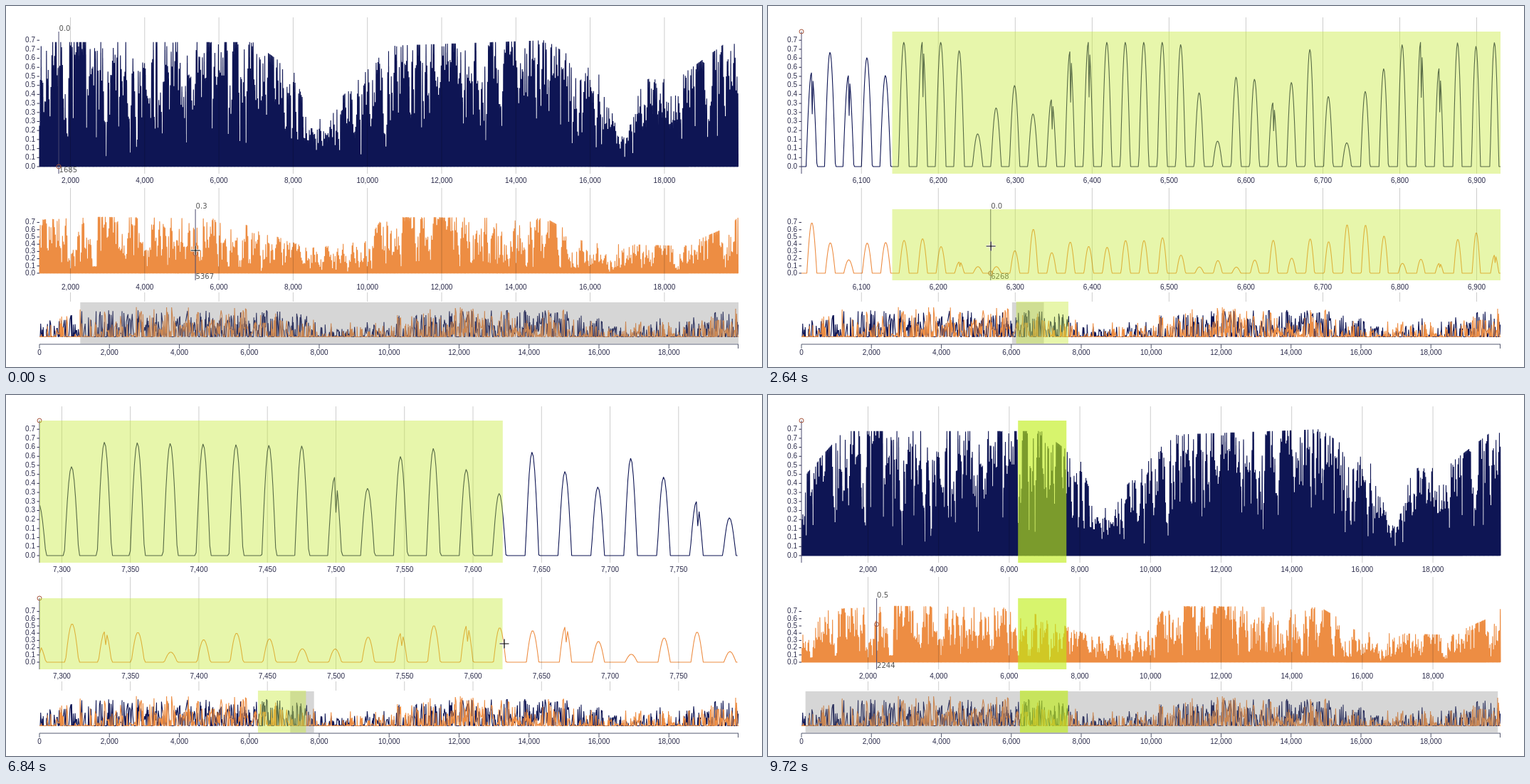
An HTML page with a canvas that plays this animation: 1062 px wide and 508 px high, repeating every 9.84 s.

```html
<!DOCTYPE html>
<html lang="en">
<head>
<meta charset="utf-8">
<title>Linked charts</title>
<style>
html, body { margin: 0; width: 100%; height: 100%; overflow: hidden; background: #fff; }
canvas { display: block; }
</style>
</head>
<body>
<canvas id="stage" width="1062" height="508"></canvas>
<script>
const LOOP = 9840, STEP = 120;
const LEFT = 47, RIGHT = 1029, WIDTH = RIGHT - LEFT;
const HOURS = 19990;
const NAVY = '#0e1554', ORANGE = '#ed8d43', INK = '#2b2b4b';
const GRID = 'rgba(0,0,0,.2)', AXIS = '#555a70';
const AXIS_FONT = '10px "Liberation Sans", Arial, sans-serif';
const HOVER_FONT = '10px "DejaVu Sans", Verdana, sans-serif';
const WHOLE = { start: 0, span: HOURS };
const stage = document.getElementById('stage');
const ctx = stage.getContext('2d');

const clamp = (v, low, high) => Math.max(low, Math.min(high, v));

// Linear interpolation through rows of [time, ...values]
function track(rows, t) {
  if (t <= rows[0][0]) return rows[0].slice(1);
  const i = rows.findIndex(row => row[0] > t);
  if (i < 0) return rows[rows.length - 1].slice(1);
  const from = rows[i - 1], to = rows[i];
  const k = (t - from[0]) / (to[0] - from[0]);
  return from.slice(1).map((v, j) => v + (to[j + 1] - v) * k);
}

function randomizer(seed) {
  return () => {
    seed = (seed + 0x6D2B79F5) | 0;
    let r = Math.imul(seed ^ (seed >>> 15), 1 | seed);
    r ^= r + Math.imul(r ^ (r >>> 7), 61 | r);
    return ((r ^ (r >>> 14)) >>> 0) / 4294967296;
  };
}

// ---- Data: one hump of daylight per day, under a seasonal ceiling and drifting weather ----
function makeSeries({ seed, ceiling, mean, swing, noon, dayScale }) {
  const random = randomizer(seed);
  const data = [];
  let weather = 0.5;
  for (let day = 0; day * 24 < HOURS; day++) {
    weather = 0.6 * weather + 0.4 * random();
    const gloom = random() < 0.06 ? 0.4 : 1;
    const notch = random() < 0.2 ? 0.57 : 1;
    const clearness = clamp(mean + (weather - 0.5) * swing, 0.12, 1) * gloom;
    const peak = track(ceiling, day * 24)[0] * clearness;
    const daylight = (12.6 - 4 * Math.cos(2 * Math.PI * day / 365)) * dayScale;
    for (let hour = 0; hour < 24; hour++) {
      const angle = Math.PI * (hour - noon) / daylight;
      const sun = Math.abs(angle) < Math.PI / 2 ? Math.cos(angle) : 0;
      data.push(peak * sun * (hour === 12 ? notch : 1));
    }
  }
  return data;
}

const navyData = makeSeries({
  seed: 11, noon: 11.1, dayScale: 1, mean: 0.78, swing: 1.6,
  ceiling: [[0, .4], [1300, .69], [6900, .69], [8000, .53], [8500, .22], [9600, .45], [10600, .67],
    [14800, .7], [16300, .5], [16800, .14], [17400, .48], [18600, .53], [19600, .68]]
});
const orangeData = makeSeries({
  seed: 29, noon: 11.5, dayScale: 0.92, mean: 0.66, swing: 2.1,
  ceiling: [[0, .35], [800, .74], [2800, .78], [6300, .75], [8400, .35], [10000, .45], [10400, .78],
    [14800, .76], [16000, .42], [18500, .38], [19500, .6], [20000, .78]]
});

const charts = [
  { data: navyData, color: NAVY, top: 36, zero: 226, unit: 254, ticks: 14, perUnit: 20 },
  { data: orangeData, color: ORANGE, top: 286, zero: 376, unit: 102, ticks: 7, perUnit: 10 }
];

// ---- Motion ----
const VIEWS = [ // time, first hour, visible hours
  [0, 1166, 18830], [1912, 1166, 18830], [2436, 6022, 909], [4440, 6022, 909],
  [5160, 7019, 909], [6600, 7019, 909], [7560, 7562.3, 90.1], [8640, 7562.3, 90.1],
  [9480, 115, 19799], [LOOP, 115, 19799]
];
const SELECTIONS = [ // time, from hour, to hour
  [360, 6140, 6140], [840, 6140, 7632], [3120, 6140, 7632], [3840, 6248, 7630],
  [5520, 6248, 7630], [5640, 6248, 7623], [8160, 6248, 7620]
];
const POINTER = [ // time, x, y
  [0, 266.1, 344], [360, 306, 340], [720, 385, 338], [1080, 313.1, 338], [2640, 313.1, 338],
  [3000, 183, 376], [3840, 292.2, 376], [3960, 307, 376], [4440, 365, 445], [5160, 414, 445],
  [5400, 707, 350], [5520, 700, 350], [7680, 700, 350], [8040, 675, 351], [8640, 675, 351],
  [9480, 152.6, 345]
];

// Zooming keeps one hour fixed on screen, so the start is linear in the span.
function viewAt(t) {
  const i = VIEWS.findIndex(row => row[0] > t);
  const [t0, a0, w0] = VIEWS[i - 1], [t1, a1, w1] = VIEWS[i];
  const k = (t - t0) / (t1 - t0);
  const span = w0 * (w1 / w0) ** k;
  const share = w0 === w1 ? k : (span - w0) / (w1 - w0);
  return { start: a0 + (a1 - a0) * share, span };
}

const selectionAt = t => t < SELECTIONS[0][0] ? null : track(SELECTIONS, t);
const xIn = (view, hour) => LEFT + (hour - view.start) / view.span * WIDTH;

// ---- Drawing ----
function line(x1, y1, x2, y2, color) {
  ctx.strokeStyle = color;
  ctx.lineWidth = 1;
  ctx.beginPath();
  ctx.moveTo(x1, y1);
  ctx.lineTo(x2, y2);
  ctx.stroke();
}

function label(text, x, y, align, font = AXIS_FONT, color = INK) {
  ctx.font = font;
  ctx.fillStyle = color;
  ctx.textAlign = align;
  ctx.textBaseline = 'middle';
  ctx.fillText(text, x, y);
}

function plot(g, data, view, zero, unit, color, stride = () => 1) {
  const last = Math.min(HOURS, Math.floor(view.start + view.span));
  g.strokeStyle = color;
  g.lineWidth = 1.1;
  g.lineJoin = 'bevel';
  g.beginPath();
  for (let h = Math.ceil(view.start); h <= last; h += stride()) {
    g.lineTo(xIn(view, h), zero - data[h] * unit);
  }
  g.stroke();
}

function band(view, from, to, top, bottom, color) {
  const x1 = clamp(xIn(view, from), LEFT, RIGHT), x2 = clamp(xIn(view, to), LEFT, RIGHT);
  ctx.fillStyle = color;
  ctx.fillRect(x1, top, x2 - x1, bottom - top);
}

function tickStep(span) {
  const raw = span / 10, power = 10 ** Math.floor(Math.log10(raw)), error = raw / power;
  return power * (error >= Math.sqrt(50) ? 10 : error >= Math.sqrt(10) ? 5 : error >= Math.SQRT2 ? 2 : 1);
}

function eachTick(view, draw) {
  const step = tickStep(view.span), end = view.start + view.span;
  for (let v = Math.ceil(view.start / step) * step; v < end; v += step) {
    draw(xIn(view, v), v.toLocaleString('en-US'));
  }
}

// Without a hovered hour the marker rests in the top left corner.
function drawHover({ data, top, zero, unit }, view, hour) {
  let x = LEFT, y = top;
  if (hour !== null) {
    x = xIn(view, hour);
    y = zero - data[hour] * unit;
    label(data[hour].toFixed(1), x + 0.5, top - 4, 'left', HOVER_FONT, '#555');
    label(String(hour), x + 0.5, zero + 5, 'left', HOVER_FONT, '#555');
  }
  line(x, top, x, zero + 10, '#4a4a70');
  ctx.strokeStyle = '#a5533a';
  ctx.beginPath();
  ctx.arc(x, y, 3, 0, 2 * Math.PI);
  ctx.stroke();
}

function drawChart(chart, view, hour, selection, green) {
  const { data, color, top, zero, unit, ticks, perUnit } = chart;
  plot(ctx, data, view, zero, unit, color);
  for (let i = 0; i <= ticks; i++) {
    const y = zero - i / perUnit * unit;
    line(43.5, y, 47, y, INK);
    label((i / perUnit).toFixed(1), 41, y, 'right');
  }
  eachTick(view, (x, text) => {
    line(x, zero < 300 ? 16 : 256, x, zero + 10, GRID);
    label(text, x, zero + 20, 'center');
  });
  drawHover(chart, view, hour);
  if (selection) band(view, ...selection, top, zero + 10, green);
}

// The overview samples the data unevenly, which leaves sparse spikes.
const overview = document.createElement('canvas');
overview.width = stage.width;
overview.height = stage.height;
const strideRandom = randomizer(3);
for (const { data, color } of charts) {
  plot(overview.getContext('2d'), data, WHOLE, 465.5, 54, color, () => 1 + Math.floor(strideRandom() * 26));
}

function drawOverview(view, selection, green) {
  ctx.drawImage(overview, 0, 0);
  band(WHOLE, view.start, view.start + view.span, 417, 475, 'rgba(119,119,119,.3)');
  if (selection) band(WHOLE, ...selection, 416, 475, green);
  line(LEFT, 476, RIGHT, 476, AXIS);
  line(RIGHT - 0.5, 476, RIGHT - 0.5, 482, AXIS);
  eachTick(WHOLE, (x, text) => {
    line(x, 476, x, 482, AXIS);
    label(text, x, 488, 'center');
  });
}

function drawPointer(x, y, resizing) {
  const arms = resizing
    ? [[-7, 0, 7, 0], [-7, 0, -3, -4], [-7, 0, -3, 4], [7, 0, 3, -4], [7, 0, 3, 4]]
    : [[-6.5, 0, 6.5, 0], [0, -6.5, 0, 6.5]];
  for (const [color, width] of [['#fff', 3], ['#000', resizing ? 2 : 1.2]]) {
    ctx.strokeStyle = color;
    ctx.lineWidth = width;
    ctx.beginPath();
    for (const [x1, y1, x2, y2] of arms) {
      ctx.moveTo(x + x1, y + y1);
      ctx.lineTo(x + x2, y + y2);
    }
    ctx.stroke();
  }
}

// The hovered hour, the upper selection and the overview lag one step behind.
function draw(t) {
  const before = Math.max(0, t - STEP);
  const view = viewAt(t), lastView = viewAt(before);
  const selection = selectionAt(t), lastSelection = selectionAt(before);
  const [x, y] = track(POINTER, t), [lastX, lastY] = track(POINTER, before);
  const still = view.start === lastView.start && view.span === lastView.span;
  const pointing = still && lastX > LEFT && lastY > 286 && lastY < 386;
  const hovered = pointing ? Math.round(view.start + (lastX - LEFT) / WIDTH * view.span) : null;
  const green = t < 9000 ? 'rgba(195,232,45,.4)' : 'rgba(190,238,20,.62)';

  ctx.fillStyle = '#fff';
  ctx.fillRect(0, 0, stage.width, stage.height);
  drawChart(charts[0], view, t < 1912 ? 1685 : null, lastSelection, green);
  drawChart(charts[1], view, hovered, selection, green);
  eachTick(view, tickX => line(tickX, 403, tickX, 416, GRID));
  drawOverview(lastView, lastSelection, green);
  if (t < 8760) drawPointer(x, y, t >= 2880 && t <= 4200);
}

let shown = -1;
function tick() {
  const step = Math.floor(performance.now() % LOOP / STEP);
  if (step !== shown) {
    shown = step;
    draw(step * STEP);
  }
  requestAnimationFrame(tick);
}
tick();
</script>
</body>
</html>
```
